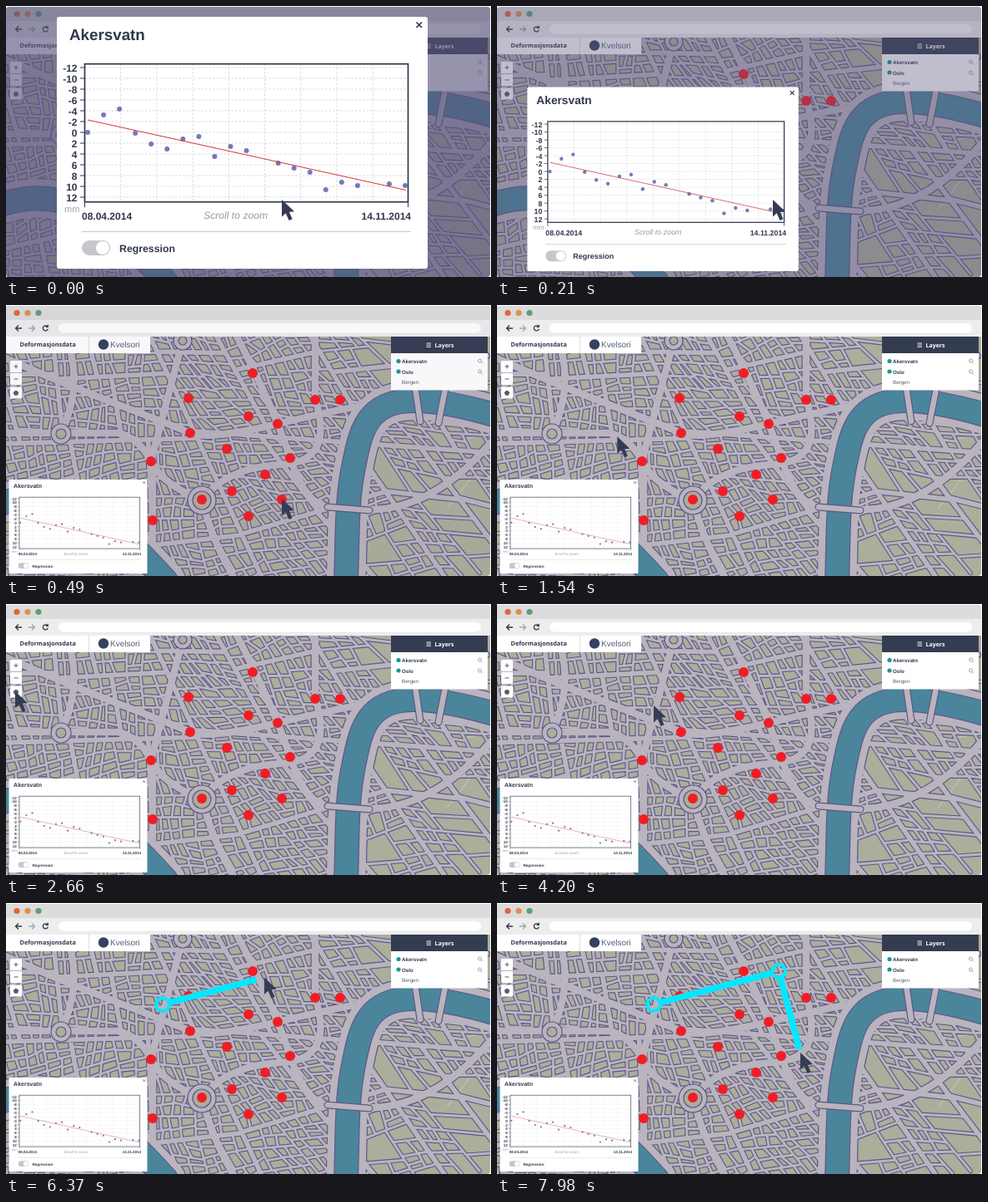
An HTML page that plays this animation: 582x326 px, repeating every 8000 ms.

```html
<!DOCTYPE html>
<html lang="no">
<head>
<meta charset="utf-8">
<title>Deformasjonsdata</title>
<style>
html, body { margin: 0; width: 100%; height: 100%; overflow: hidden; background: #fff; }
svg { display: block; width: 582px; height: 326px; font-family: "Liberation Sans", Arial, sans-serif; text-rendering: geometricPrecision; }
.b { font-weight: bold; fill: #30384c; }
.ui { font-family: "Open Sans", sans-serif; font-weight: bold; font-size: 7.3px; fill: #30384c; }
.line { fill: none; stroke-linecap: round; stroke-linejoin: round; }
.edge { stroke: #5e5689; }
.road { stroke: #b9b4bd; }
.icon { fill: none; stroke: #30384c; stroke-width: 1.3; }
.cyan { fill: none; stroke: #00e8ff; }
</style>
</head>
<body>
<svg viewBox="0 0 582 326">
  <defs>
    <clipPath id="window"><rect y="1" width="581" height="325" rx="4"/></clipPath>
    <path id="lanes"/>
    <path id="avenues"/>
    <path id="main" d="M212 43 Q196 105 176 180 V330
      M-5 62 Q70 95 135 120 T221 154 T326 143 T425 122
      M-5 154 H135 Q160 160 174 188 T235 235
      M66 155 Q95 90 70 35
      M235 235 Q265 195 330 192 T371 113 V40
      M276 36 Q320 120 341 184 T395 243
      M235 235 Q250 290 275 330
      M428 246 Q510 250 582 165"/>
    <path id="river" d="M592 134 C545 120 505 112 475 116 C432 122 425 155 418 190 C408 235 410 280 408 332 M-12 241 C60 215 110 240 192 332"/>
    <path id="bridges" d="M490 92 L497 140 M528 96 L519 142 M386 243 L436 247"/>
    <g id="lens"><circle r="2"/><path d="M1.5 1.5 L3.4 3.4"/></g>
  </defs>
  <g clip-path="url(#window)">
    <rect width="582" height="326" fill="#abae9b"/>
    <path class="line" stroke="#c0c3b4" stroke-width="1.3" d="M545 184 Q535 163 556 160 T582 152 M546 184 Q566 196 554 213 T530 244"/>
    <g class="line">
      <g class="edge">
        <use href="#lanes" stroke-width="5.2"/>
        <use href="#avenues" stroke-width="8"/>
        <use href="#river" stroke-width="49"/>
        <use href="#main" stroke-width="11"/>
      </g>
      <g class="road">
        <use href="#lanes" stroke-width="3"/>
        <use href="#avenues" stroke-width="5.8"/>
        <use href="#river" stroke-width="46.6"/>
        <use href="#main" stroke-width="8.6"/>
      </g>
      <use href="#river" class="edge" stroke-width="30"/>
      <use href="#river" stroke="#4b859c" stroke-width="27.6"/>
      <use href="#bridges" class="edge" stroke-width="9"/>
      <use href="#bridges" class="road" stroke-width="6.6"/>
    </g>
    <g id="islands" class="edge" stroke-width="1.2"></g>
    <g id="dots" fill="#f01d25"></g>

    <rect width="582" height="18" fill="#dcdcdc"/>
    <circle cx="13" cy="9.5" r="3.6" fill="#e2653c"/>
    <circle cx="26" cy="9.5" r="3.6" fill="#dd914a"/>
    <circle cx="39" cy="9.5" r="3.6" fill="#5aa272"/>
    <rect y="18" width="582" height="20" fill="#ededed"/>
    <rect x="63" y="22" width="507" height="11.5" rx="5.7" fill="#fff"/>
    <g class="icon">
      <path d="M19 28 H11.5 M15 24.5 L11.5 28 L15 31.5"/>
      <path d="M27 28 H34.5 M31 24.5 L34.5 28 L31 31.5" style="stroke:#a5a8ae"/>
      <path d="M49.5 25.8 A3 3 0 1 0 50.3 28.6 M50.2 23.8 V26.4 H47.6"/>
    </g>

    <rect y="38" width="173" height="20" fill="#fff"/>
    <path d="M99.5 38 V58" stroke="#ddd"/>
    <text class="ui" x="16.5" y="50">Deformasjonsdata</text>
    <circle cx="117" cy="47.5" r="6.2" fill="#34415f"/>
    <text x="125" y="51" font-size="10" fill="#52617a">Kvelsori</text>

    <g fill="#fff"><rect x="5" y="67" width="14" height="14" rx="1"/><rect x="5" y="82" width="14" height="14" rx="1"/><rect x="5" y="98.5" width="14" height="14" rx="1"/></g>
    <path d="M9.5 74 h5 M12 71.5 v5 M9.5 89 h5" stroke="#555c6a"/>
    <path d="M12 102.5 l3.3 2.4 -1.3 3.8 h-4 l-1.3 -3.8 z" fill="#555c6a"/>

    <rect x="462" y="38" width="116" height="20" fill="#343c52"/>
    <path d="M504.5 46 h5.5 m-5.5 2.2 h5.5 m-5.5 2.2 h5.5" stroke="#fff" stroke-width=".9"/>
    <text class="ui" x="514.5" y="50.5" style="fill:#fff;font-size:7px">Layers</text>
    <rect x="462" y="58" width="116" height="44.5" fill="#fff"/>
    <g fill="#1a9990"><circle cx="471" cy="67.5" r="2.6"/><circle cx="471" cy="80" r="2.6"/></g>
    <g font-size="6.2">
      <text class="b" x="475" y="70">Akersvatn</text>
      <text class="b" x="475" y="82.5">Oslo</text>
      <text x="475" y="95" fill="#555c6a">Bergen</text>
    </g>
    <g fill="none" stroke="#8a8e98" stroke-width=".8"><use href="#lens" x="568.5" y="67"/><use href="#lens" x="568.5" y="80"/></g>
    <rect id="shade" width="582" height="326" fill="#56517a"/>
  </g>

  <g id="modal"><g transform="translate(-61 -13)">
    <rect x="61" y="13" width="445" height="303" rx="3" fill="#fff"/>
    <text class="b" x="76" y="41" font-size="18.8">Akersvatn</text>
    <path d="M492.5 19.5 l6.5 6.5 m0 -6.5 l-6.5 6.5" stroke="#30384c" stroke-width="1.7"/>
    <path id="grid" stroke="#d9d9d9" stroke-dasharray="2.5 2"/>
    <path id="ticks" stroke="#30384c"/>
    <rect x="94.5" y="69.7" width="388" height="166" fill="none" stroke="#30384c" stroke-width="1.7"/>
    <g id="labels" class="b" font-size="12" text-anchor="end"></g>
    <g id="points" fill="#727bb7"></g>
    <path d="M98 137 L480 221.5" stroke="#d2363b"/>
    <text x="70" y="248" font-size="11" fill="#a0a0a0">mm</text>
    <g font-size="12">
      <text class="b" x="91" y="257">08.04.2014</text>
      <text class="b" x="486" y="257" text-anchor="end">14.11.2014</text>
      <text x="237" y="256" fill="#9b9b9b" font-style="italic" font-size="12.2">Scroll to zoom</text>
      <text class="b" x="136" y="296" font-size="12.3">Regression</text>
    </g>
    <path d="M91 271.5 H486" stroke="#c8c8c8"/>
    <rect x="91" y="282" width="34" height="18" rx="9" fill="#c6c6cb"/>
    <circle cx="116" cy="291" r="8.5" fill="#fff" stroke="#c6c6cb"/>
  </g></g>

  <g class="cyan">
    <path id="lines" stroke-width="7.5"/>
    <circle id="ringA" cx="188" cy="122" r="8" stroke-width="4"/>
    <circle id="ringB" cx="338" cy="82" r="8" stroke-width="4"/>
    <circle id="ripple" stroke-width="4"/>
  </g>
  <path id="cursor" fill="#343c52" d="M0 0 V20.5 L4.7 16.2 L8.6 25 L12.6 23.2 L8.8 14.8 L15 14.3 Z"/>
</svg>
<script>
const $ = id => document.getElementById(id);
const circles = (list, r) => list.map(([x, y]) => `<circle cx="${x}" cy="${y}" r="${r}"/>`).join('');
const mix = (p, q, k) => p.map((n, i) => n + (q[i] - n) * k);
const dist = (p, q) => Math.hypot(q[0] - p[0], q[1] - p[1]);

let seed = 11;
const rand = () => (seed = seed * 16807 % 2147483647) / 2147483647;

// The town: a quarter is cut across its long side until it is one small block
let lanes = '', avenues = '';
function cut(a, b, c, d, depth = 0) {
  const area = Math.abs((c[0] - a[0]) * (d[1] - b[1]) - (c[1] - a[1]) * (d[0] - b[0])) / 2;
  const east = (a[0] + c[0]) / 2 > 435;
  if (area < 300 || (east && area < 5000 && rand() < .22)) return;
  if (dist(a, b) + dist(c, d) < dist(b, c) + dist(d, a)) [a, b, c, d] = [b, c, d, a];
  const p = mix(a, b, .36 + rand() * .28), q = mix(d, c, .36 + rand() * .28);
  const street = `M${p}L${q}`;
  if (depth < 5) avenues += street; else lanes += street;
  cut(a, p, q, d, depth + 1);
  cut(p, b, c, q, depth + 1);
}
cut([-60, 30], [540, -50], [660, 310], [0, 400]);
$('lanes').setAttribute('d', lanes);
$('avenues').setAttribute('d', avenues);

// Roundabouts
$('islands').innerHTML = [[212, 43, 5], [66, 155, 6], [235, 235, 11]].map(([x, y, r]) =>
  `<circle cx="${x}" cy="${y}" r="${r + 6}" fill="#b9b4bd"/><circle cx="${x}" cy="${y}" r="${r}" fill="#abae9b"/>`).join('');

$('dots').innerHTML = circles([
  [296, 82], [219, 112], [371, 114], [401, 114], [291, 134], [326, 143], [221, 154], [265, 173],
  [341, 184], [174, 188], [311, 204], [271, 224], [235, 234], [331, 234], [176, 259], [291, 254]
], 6);

// Chart: one reading every 19 px, two of them missing
let grid = '', ticks = '', labels = '';
for (let i = 0; i < 13; i++) {
  const y = 74 + i * 13;
  grid += `M95 ${y}H482`;
  ticks += `M89 ${y}H94`;
  labels += `<text x="85.5" y="${y + 5}">${i * 2 - 12}</text>`;
}
for (let i = 1; i < 9; i++) grid += `M${94.5 + i * 43.2} 70V235`;
$('grid').setAttribute('d', grid);
$('ticks').setAttribute('d', ticks + 'M94.5 236v6M482.5 236v6');
$('labels').innerHTML = labels;
const readings = [152, 131, 124, 153, 166, 172, 160, 157, 181, 169, 174, , 189, 195, 200, 221, 212, 216, , 214, 216];
const points = [];
readings.forEach((y, i) => points.push([98 + i * 19.05, y]));
$('points').innerHTML = circles(points, 3);

const progress = (t, from, to) => Math.min(1, Math.max(0, (t - from) / (to - from)));
const show = (id, on) => $(id).setAttribute('visibility', on ? 'visible' : 'hidden');

const A = [188, 122], B = [338, 82], C = [364, 180];
const button = [11, 105];
const moves = [
  [1050, 1890, [331, 233], button], [3500, 4200, button, A],
  [5460, 6580, A, B], [7000, 7980, B, C]
];
function pointer(t) {
  const [start, end, from, to] = moves.findLast(m => t >= m[0]) || moves[0];
  return mix(from, to, progress(t, start, end));
}

// Line from the rim of one ring, k of the way, stopping short of the next rim
function measure(p, q, k, gap) {
  const len = dist(p, q), end = Math.min(len - gap, len * k);
  return end > 9 ? `M${mix(p, q, 9 / len)}L${mix(p, q, end / len)}` : '';
}

const clicks = [[2310, button], [4620, A], [6580, B]];
function draw() {
  const t = Math.floor(performance.now() % 8000 / 70) * 70;
  const p = progress(t, 0, 490);
  $('modal').setAttribute('transform', `translate(${61 - 57.5 * p} ${13 + 197 * p}) scale(${1 - .627 * p})`);
  $('shade').setAttribute('opacity', .62 * (1 - progress(t, 0, 525)));
  $('cursor').setAttribute('transform', `translate(${pointer(t)})`);
  show('ringA', t >= 4620);
  show('ringB', t >= 6580);
  $('lines').setAttribute('d',
    measure(A, B, progress(t - 70, 5460, 6580), 9) + measure(B, C, progress(t - 40, 7000, 7980), 0));
  const click = clicks.find(([start]) => t >= start && t < start + 350);
  show('ripple', click);
  if (click) {
    const [start, [x, y]] = click, k = (t - start) / 350;
    $('ripple').setAttribute('transform', `translate(${x} ${y})`);
    $('ripple').setAttribute('r', 4 + 18.75 * k);
    $('ripple').setAttribute('opacity', 1 - k);
  }
  requestAnimationFrame(draw);
}
draw();
</script>
</body>
</html>
```
